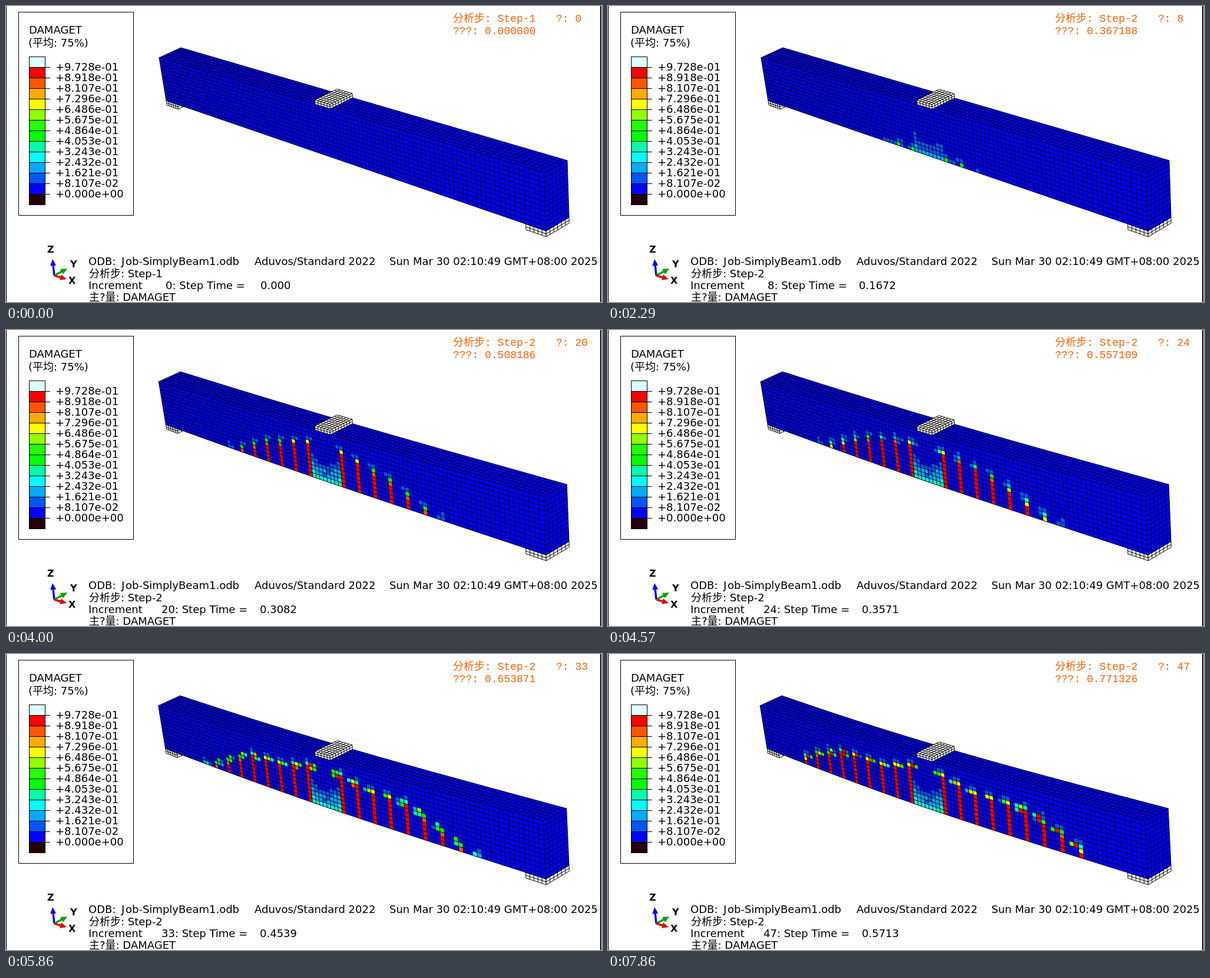
Animation of 1012x504 px, one loop 8000 ms. Source, as an HTML page with a canvas:

```html
<!DOCTYPE html>
<html lang="zh">
<head>
<meta charset="utf-8">
<title>DAMAGET</title>
<style>
html, body { margin: 0; width: 100%; height: 100%; overflow: hidden; background: #fff; }
canvas { display: block; }
</style>
</head>
<body>
<canvas id="stage" width="1012" height="504"></canvas>
<script>
const ctx = document.getElementById('stage').getContext('2d');
const LOOP = 8000, LAST = 55, STEP1 = 8;
const SANS = '"DejaVu Sans", "Noto Sans CJK SC", "Noto Sans CJK", sans-serif';
const MONO = '"Liberation Mono", "Noto Sans CJK SC", "Noto Sans CJK", monospace';
const ORANGE = '#ff5f00';
const SCALE = ['#0000ff', '#0055ff', '#00aaff', '#00ffff', '#00ffaa', '#00ff00',
  '#24ff00', '#92ff00', '#ffff00', '#ffaa00', '#ff5500', '#ff0000'];
const LABELS = ['9.728e-01', '8.918e-01', '8.107e-01', '7.296e-01', '6.486e-01', '5.675e-01',
  '4.864e-01', '4.053e-01', '3.243e-01', '2.432e-01', '1.621e-01', '8.107e-02', '0.000e+00'];

const clamp = x => Math.max(0, Math.min(1, x));
const lerp = (a, b, t) => a + (b - a) * t;
const mix = (p, q, t) => [lerp(p[0], q[0], t), lerp(p[1], q[1], t)];
const noise = (a, b) => {
  const n = Math.sin(a * 12.9898 + b * 78.233) * 43758.5;
  return n - Math.floor(n);
};
function interp(xs, ys, x) {
  if (x <= xs[0]) return ys[0];
  for (let i = 1; i < xs.length; i++)
    if (x <= xs[i]) return lerp(ys[i - 1], ys[i], (x - xs[i - 1]) / (xs[i] - xs[i - 1]));
  return ys[ys.length - 1];
}

// Solver increments
const INC = [0, 1, 2, 3, 4, 5, 6, 7, 8, 20, 28, 39, 47];
const TIME1 = [0, .01, .02, .035, .0575, .09125, .141875, .2];
const TIME2 = [...TIME1.slice(0, 7), .15453125, .1671875, .308186, .406031, .511278, .571326];
function state(k) {
  const second = k >= STEP1, inc = second ? k - STEP1 : k;
  const time = second ? interp(INC, TIME2, inc) : TIME1[inc];
  return { k, inc, time, step: second ? 2 : 1, total: time + (second ? .2 : 0) };
}

// Beam space: u along the length, d into the depth, v downwards
const NU = 100, ND = 6, NV = 12, PERSP = .7385;
const FRONT = [[260, 88], [914, 284], [917, 383], [272, 161]];
const BACK = [[297, 71], [953, 263], [956, 360], [309, 143]];
let sag = 0;
function pt(u, d, v) {
  const f = u * PERSP / (1 - u + u * PERSP);
  const c = FRONT.map((p, i) => mix(p, BACK[i], d));
  const [x, y] = mix(mix(c[0], c[3], v), mix(c[1], c[2], v), f);
  const w = clamp(v);
  const pull = (1 - u) * w + Math.abs(2 * u - 1) * (1 - w);
  return [x - .22 * sag * pull, y + sag * Math.sin(Math.PI * u)];
}

function trace(points) {
  points.forEach((p, i) => i ? ctx.lineTo(...p) : ctx.moveTo(...p));
}
function poly(points, fill) {
  ctx.beginPath();
  trace(points);
  ctx.closePath();
  ctx.fillStyle = fill;
  ctx.fill();
}
// map(a, b) gives a point of the face for a, b in 0..1
function face(map, na, nb, fill, cellFill) {
  const row = b => Array.from({ length: na + 1 }, (_, i) => map(i / na, b));
  poly([...row(0), ...row(1).reverse()], fill);
  if (cellFill) for (let i = 0; i < na; i++) for (let j = 0; j < nb; j++) {
    const colour = cellFill(i, j);
    if (!colour) continue;
    const a = i / na, b = j / nb, a2 = (i + 1) / na, b2 = (j + 1) / nb;
    poly([map(a, b), map(a2, b), map(a2, b2), map(a, b2)], colour);
  }
  ctx.beginPath();
  for (let j = 0; j <= nb; j++) trace(row(j / nb));
  for (let i = 0; i <= na; i++) trace([map(i / na, 0), map(i / na, 1)]);
  ctx.strokeStyle = '#000';
  ctx.lineWidth = .95;
  ctx.stroke();
}
function block(u0, u1, v0, v1, fill, nu, nd, nv, cellFill) {
  const u = a => lerp(u0, u1, a), v = b => lerp(v0, v1, b);
  face((a, b) => pt(u(a), 1 - b, v0), nu, nd, fill);
  face((a, b) => pt(u(a), 0, v(b)), nu, nv, fill, cellFill);
  face((a, b) => pt(u1, a, v(b)), nd, nv, fill);
}

// Crack heights in cells, from midspan outwards, mirrored on both halves
const KEYS = [14, 16, 22, 28, 36, 47, 55];
const CRACKS = [
  [0, 1, 6, 9, 9, 10, 10],
  [0, 1, 5, 8, 8.5, 8.5, 9],
  [0, 0, 4, 7, 8, 8, 8],
  [0, 0, 3, 6, 8, 8, 8],
  [0, 0, 1, 4, 7, 8, 8],
  [0, 0, 0, 2, 5.5, 7, 7.5],
  [0, 0, 0, .35, 3, 5.5, 6.3],
  [0, 0, 0, 0, .6, 4, 5],
  [0, 0, 0, 0, 0, .9, 2.7]
];
function damage(col, row, k) {
  if (k < 15) return 0;
  const c = col < 50 ? 45 - col : col - 54;
  const off = ((-c % 4) + 4) % 4, m = (c + off) / 4;
  const r = noise(col, row);
  let v = 0;
  if (c < 0) {
    const grow = interp([14, 16, 26], [0, .55, 1], k);
    v = grow * (.34 - .05 * row + .08 * (r - .5) + (row ? .03 * (c + 1) : 0));
  } else if (k < 20 && row === 0 && c < 9 && r > .4) v = .1;
  const h = m >= 0 && m < 9 ? interp(KEYS, CRACKS[m], k) : 0;
  if (h < .2) return v;
  const s = h - row;
  if (off === 0) return Math.max(v, s > 0 ? s / (h > 7 ? 1.4 : 2.4) : s > -.8 ? .12 : 0);
  // Tips bend towards the load
  const hook = clamp((k - 29 - m) / 12);
  if (off < 3 && s > 0 && s <= 1.5) v = Math.max(v, hook * (off === 1 ? .55 + .6 * r : .6 * r));
  if (off === 1 && s > -.5 && s < 1) v = Math.max(v, .1 + .06 * r);
  return v;
}

function text(s, x, y, font = '18px ' + SANS, colour = '#000') {
  ctx.font = font;
  ctx.fillStyle = colour;
  ctx.fillText(s, x, y);
}
function legend() {
  ctx.strokeStyle = '#000';
  ctx.lineWidth = 1;
  ctx.strokeRect(21.5, 10.5, 195, 346);
  text('DAMAGET', 39, 47);
  text('(平均: 75%)', 38, 69);
  ['#dbffff', ...SCALE.slice().reverse(), '#240000'].forEach((colour, i) => {
    ctx.fillStyle = colour;
    ctx.fillRect(39.5, 86.5 + 18 * i, 27, 18);
    ctx.strokeRect(39.5, 86.5 + 18 * i, 27, 18);
  });
  LABELS.forEach((s, i) => {
    const y = 104 + 18 * i;
    ctx.fillStyle = '#000';
    ctx.fillRect(67, y, 8, 1);
    text('+' + s, 84, y + 6);
  });
}
function arrow(x, y, colour) {
  const ox = 82, oy = 459, len = Math.hypot(x - ox, y - oy);
  ctx.save();
  ctx.translate(ox, oy);
  ctx.rotate(Math.atan2(y - oy, x - ox));
  ctx.fillStyle = colour;
  ctx.fillRect(0, -1.7, len - 9, 3.4);
  poly([[len, 0], [len - 11, -5], [len - 11, 5]], colour);
  ctx.restore();
}
function triad() {
  arrow(79, 431, '#0000f0');
  arrow(104, 447, '#00a000');
  arrow(103, 465, '#e00000');
  const bold = 'bold 16px ' + SANS;
  text('Z', 70, 420, bold);
  text('Y', 109, 445, bold);
  text('X', 106, 473, bold);
}
function captions({ inc, time, step, total }) {
  text('ODB: ', 140, 441);
  text('J', 196, 441);
  text('ob-SimplyBeam1.odb', 203, 441);
  text('Aduvos/Standard 2022', 422, 441);
  text('Sun Mar 30 02:10:49 GMT+08:00 2025', 651, 441);
  text('分析步: Step-' + step, 141, 462);
  text('Increment', 140, 482);
  const wide = inc > 9;
  text(inc + ': Step Time =', wide ? 264 : 271, 482);
  const value = !inc ? '0.000' : time >= .1 ? time.toFixed(4)
    : time.toExponential(4).replace(/e-(\d)$/, 'E-0$1');
  text(value, (inc ? 426 : 432) + (wide ? 5 : 0), 482);
  text('主?量: DAMAGET', 141, 502);

  const mono = '18px ' + MONO;
  text('分析步: Step-' + step, 759, 27, mono, ORANGE);
  text('?: ' + inc, 934, 27, mono, ORANGE);
  text('???: ' + total.toFixed(6), 759, 48, mono, ORANGE);
}

function draw(k) {
  const now = state(k);
  sag = Math.max(0, now.total - .345) * 19.5;
  ctx.fillStyle = '#fff';
  ctx.fillRect(0, 0, 1012, 504);
  ctx.fillStyle = '#000';
  ctx.fillRect(0, 0, 1, 504);
  ctx.fillRect(1009, 0, 2, 504);
  legend();
  triad();
  captions(now);

  const pad = '#f2f2f0';
  block(0, .04, 1, 1.11, pad, 5, 6, 2);
  block(.96, 1, 1, 1.1, pad, 5, 6, 2);
  block(0, 1, 0, 1, SCALE[0], NU, ND, NV, (i, j) => {
    const level = Math.min(11, Math.floor(damage(i, NV - 1 - j, k) * 12));
    return level > 0 && SCALE[level];
  });
  block(.48, .52, -.09, 0, pad, 5, 8, 2);
}

// Seven increments per second, on a 10 ms clock
const tick = k => Math.round(k * 100 / 7) * 10;
let shown = -1;
function frame() {
  const t = performance.now() % LOOP;
  let k = Math.min(LAST, Math.floor(t * 7 / 1000) + 1);
  while (k > 0 && tick(k) > t) k--;
  if (k !== shown) draw(shown = k);
  requestAnimationFrame(frame);
}
frame();
</script>
</body>
</html>
```
